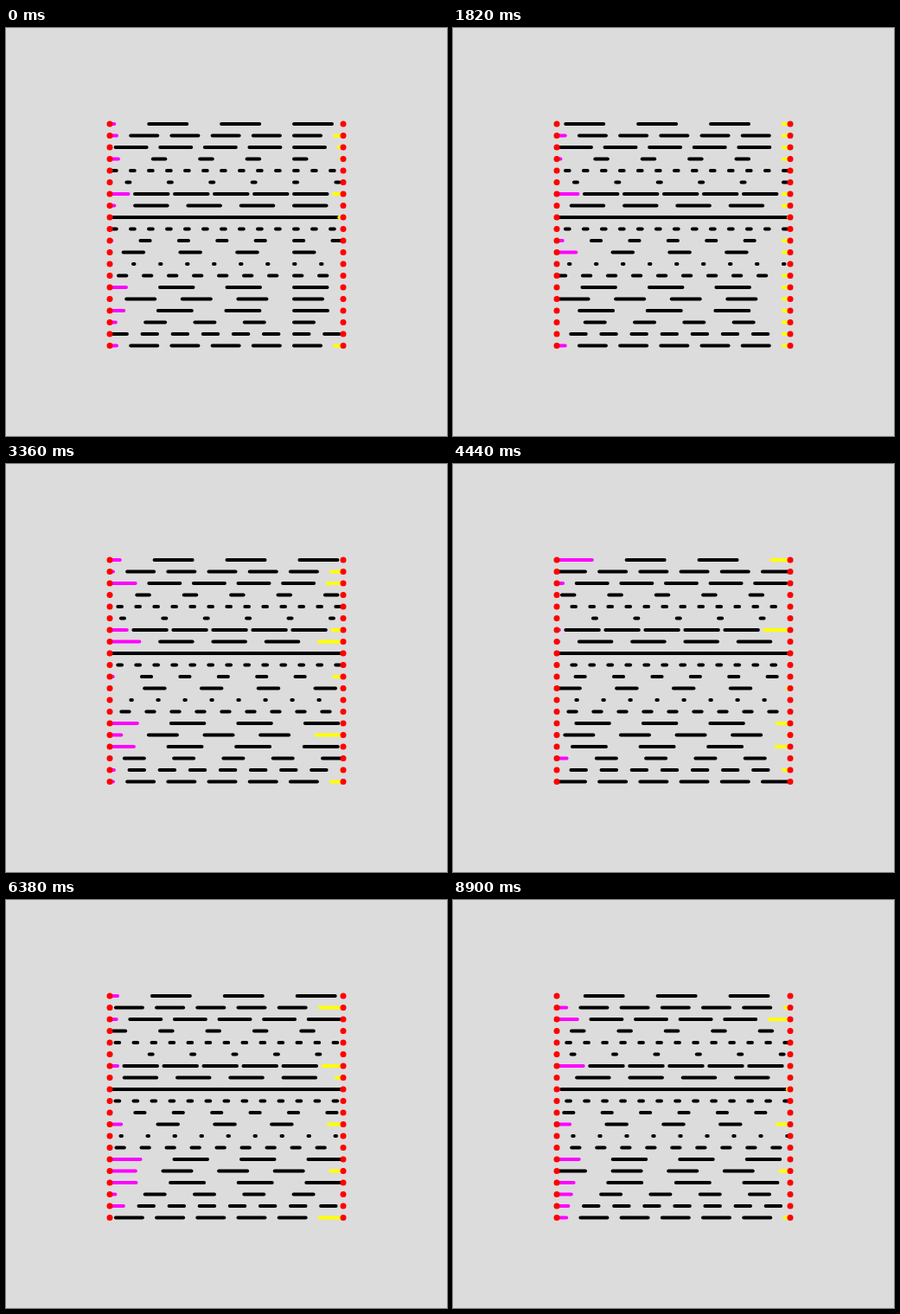
Recreate the animation shown at these times as an HTML page with a canvas. Size 510 by 472 pixels, loop 8930 ms.

```html
<!DOCTYPE html>
<html>
<head>
<meta charset="utf-8">
<style>
html, body { margin: 0; width: 510px; height: 472px; overflow: hidden; background: #dcdcdc; }
canvas { display: block; }
</style>
</head>
<body>
<canvas id="stage" width="510" height="472"></canvas>
<script>
const ctx = document.getElementById('stage').getContext('2d');
const LOOP = 8930, LEFT = 120, TOP = 111, WIDTH = 270, ROW = 13.5;

// One dash pattern per row: dash length and period
const patterns = [
  [44, 83.9], [31, 47.2], [36, 51.6], [14.5, 54.4], [4.7, 21],
  [4, 48.4], [38.5, 46], [37.5, 61.3], [4.9, 5.8], [4.7, 21],
  [11.2, 44.4], [23.5, 65.8], [1.5, 31], [9.3, 29], [38.5, 77.5],
  [33, 64.6], [39, 78.6], [23, 57.3], [17.5, 35.1], [31, 47.2]
];

function line(from, to, y, color) {
  ctx.strokeStyle = color;
  ctx.beginPath();
  ctx.moveTo(LEFT + from, y);
  ctx.lineTo(LEFT + to, y);
  ctx.stroke();
}

function dot(x, y) {
  ctx.beginPath();
  ctx.arc(x, y, 3.5, 0, 2 * Math.PI);
  ctx.fill();
}

// Dashes cut by either end of the line are highlighted
function dashedLine(y, dash, period, offset) {
  for (let x = offset % period - period; x < WIDTH; x += period) {
    const end = x + dash;
    if (end <= 0) continue;
    const color = x < 0 ? '#f0f' : end > WIDTH ? '#ff0' : '#000';
    line(Math.max(x, 0), Math.min(end, WIDTH), y, color);
  }
}

function draw(time) {
  const offset = 213 + 240 * (time % LOOP) / LOOP;
  ctx.clearRect(0, 0, 510, 472);
  ctx.lineWidth = 4;
  ctx.lineCap = 'round';
  ctx.fillStyle = '#f00';
  patterns.forEach(([dash, period], i) => {
    const y = TOP + i * ROW;
    dashedLine(y, dash, period, offset);
    dot(LEFT, y);
    dot(LEFT + WIDTH, y);
  });
}

const start = performance.now();
function tick() {
  draw(performance.now() - start);
  requestAnimationFrame(tick);
}
tick();
</script>
</body>
</html>
```
